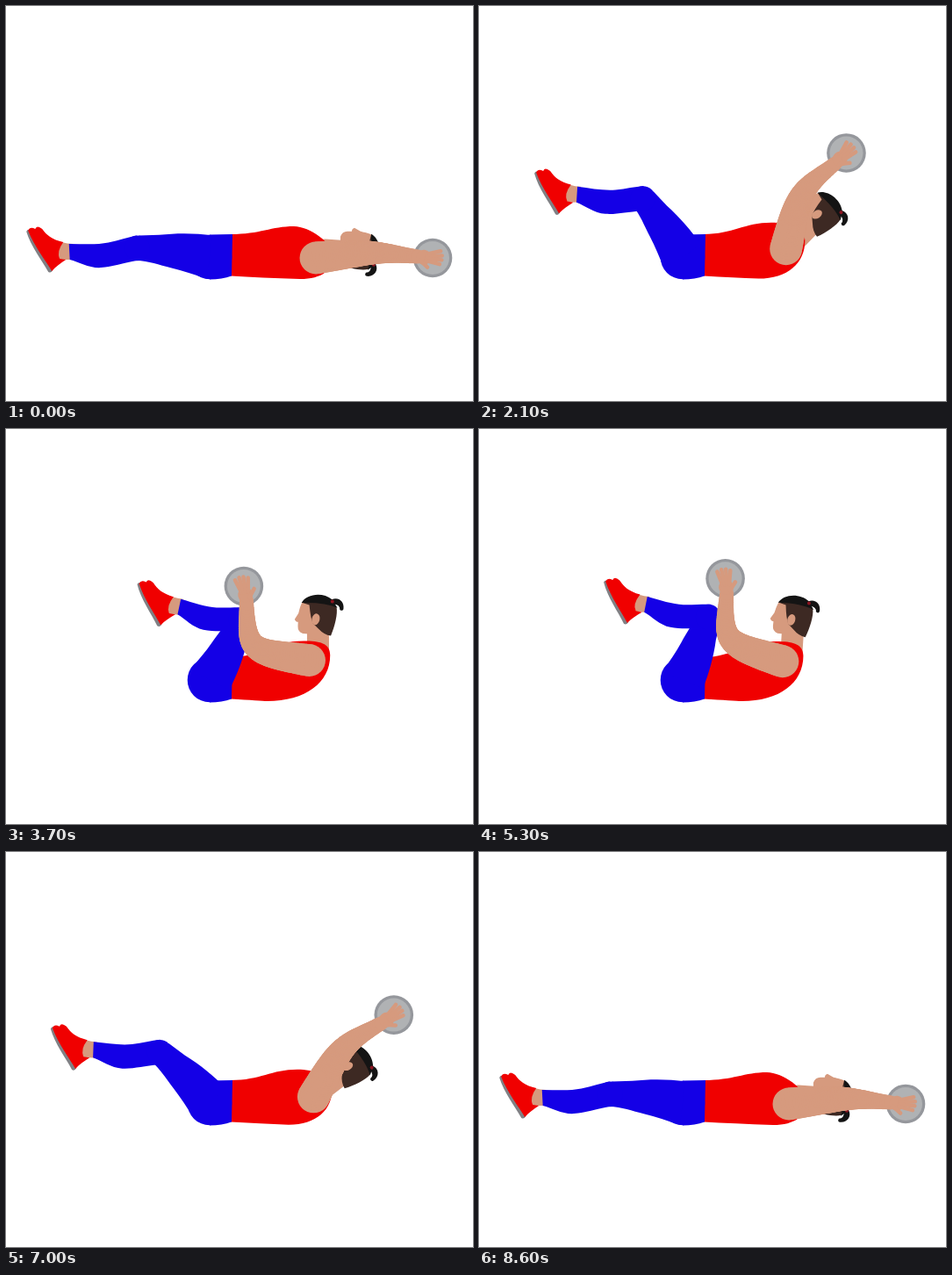
Recreate the animation shown at these times as an HTML page with a canvas. Size 532x450 px, loop 8700 ms.

```html
<!DOCTYPE html>
<html lang="en">
<head>
<meta charset="utf-8">
<title>Weighted crunch</title>
<style>
  html, body { margin: 0; width: 100%; height: 100%; overflow: hidden; background: #fff; }
  canvas { display: block; position: fixed; left: 0; top: 0; }
</style>
</head>
<body>
<canvas id="stage" width="532" height="450"></canvas>
<script>
const ctx = document.getElementById('stage').getContext('2d');
const LOOP = 8700, STEP = 100;
const SKIN = '#d69a7e', RED = '#f00000', BLUE = '#1400e6', BLACK = '#141414', BROWN = '#3d2923';
const HIP = { x: 232, y: 286 };
const UPPER_ARM = 64, FOREARM = 69.5;

const shapes = {
  face: new Path2D('M-16-16C-19-10-19-6-20-3L-24 4Q-23 7-20 7L-20 12Q-20 18-14 20L-7 20L-5 26L14 24L17-10Z'),
  hair: new Path2D('M-16-15C-8-20 14-22 23-12C25-4 22 10 18 21Q10 20 4 14L-3 8Q-6 2-8-13Z'),
  cap: new Path2D('M-17-15C-12-25 6-29 18-20L24-11Q10-17-17-15Z'),
  bun: new Path2D('M17-20C24-24 32-19 31-10Q30-7 27-9Q27-15 19-15Z'),
  sole: new Path2D('M-49-23Q-48-26-45-25L-19 21Q-21 25-24 23C-31 10-44-6-49-23Z'),
  shoe: new Path2D('M-47-24Q-45-29-39-26Q-37-31-31-26C-26-19-20-14-7-11Q-15 0-11 8L-4 9C-10 13-16 17-20 22C-27 10-40-6-47-24Z'),
  ankle: new Path2D('M-9-11Q-2-9 4-9L4 9L-11 9Q-15 0-9-11Z'),
  shin: new Path2D('M0-14.5C10-13 20-10 32-8C45-6 60-8 76-9L76 9C66 12 55 20 42 20C28 20 18 16 0 14Z'),
  thigh: new Path2D('M0-25C18-25 38-23 58-18L80-14.5L80 14C65 13 55 16 40 17.6C28 19 14 22 0 25Z'),
  pelvis: new Path2D('M232 260.5L258 260L257 307.5Q246 311.5 232 311.5Z')
};

const mix = (a, b, u) => a + (b - a) * u;
const heading = (a, b) => Math.atan2(b.y - a.y, b.x - a.x);
const distance = (a, b) => Math.hypot(b.x - a.x, b.y - a.y);
const radians = degrees => degrees * Math.PI / 180;

// Point at a distance from another; 0 degrees is right, 90 is up
const polar = (from, length, degrees) => ({
  x: from.x + length * Math.cos(radians(degrees)),
  y: from.y - length * Math.sin(radians(degrees))
});

function fill(path, color) {
  ctx.fillStyle = color;
  ctx.fill(path);
}

function disc(x, y, r, color) {
  ctx.fillStyle = color;
  ctx.beginPath();
  ctx.arc(x, y, r, 0, 2 * Math.PI);
  ctx.fill();
}

function line(x1, y1, x2, y2, width) {
  ctx.strokeStyle = SKIN;
  ctx.lineCap = 'round';
  ctx.lineWidth = width;
  ctx.beginPath();
  ctx.moveTo(x1, y1);
  ctx.lineTo(x2, y2);
  ctx.stroke();
}

function placed(p, angle, draw) {
  ctx.save();
  ctx.translate(p.x, p.y);
  ctx.rotate(angle);
  draw();
  ctx.restore();
}

// 0 is stretched out, 1 is fully curled; the way back lingers a little
function curlAt(step) {
  const half = LOOP / STEP / 2;
  const swing = (1 - Math.cos(Math.PI * step / half)) / 2;
  const q = step < half ? swing : swing ** .85;
  return 1.15 * q * q / (q + .15);
}

function drawHead(shoulder, curl) {
  const tilt = curl ** .8, angle = radians(mix(90, -2, tilt));
  const head = polar(shoulder, 49 + 7 * Math.sin(Math.PI * curl), mix(12, 85, tilt));
  const c = Math.cos(angle), s = Math.sin(angle);
  line(head.x + 3 * c - 13 * s, head.y + 3 * s + 13 * c, shoulder.x + 10, shoulder.y - 9, 25);
  placed(head, angle, () => {
    fill(shapes.face, SKIN);
    fill(shapes.hair, BROWN);
    fill(shapes.cap, BLACK);
    fill(shapes.bun, BLACK);
    disc(18, -18, 2, '#8c1420');
    ctx.fillStyle = SKIN;
    ctx.beginPath();
    ctx.ellipse(0, 3, 4.5, 6.5, .2, 0, 2 * Math.PI);
    ctx.fill();
  });
}

function drawShirt(curl) {
  const top = { x: mix(328, 340, curl), y: mix(251, 241, curl) };
  const right = { x: mix(373, 369, curl), y: mix(285, 257, Math.sqrt(curl)) };
  const base = { x: mix(335, 295, curl), y: mix(311, 310, curl) };
  ctx.fillStyle = RED;
  ctx.beginPath();
  ctx.moveTo(256, 260);
  ctx.bezierCurveTo(290, 260, 302, top.y, top.x, top.y);
  ctx.bezierCurveTo(top.x + 18, top.y, right.x, right.y - 14, right.x, right.y);
  ctx.bezierCurveTo(right.x, mix(right.y, base.y, .6), base.x + mix(25, 45, curl), base.y, base.x, base.y);
  ctx.quadraticCurveTo(290, 309.5, 256, 307.5);
  ctx.fill();
}

function drawLeg(curl) {
  const knee = polar(HIP, mix(83, 77, curl), 180 - mix(7, 125, curl));
  const ankle = polar(knee, mix(77.5, 72, curl), 180 - mix(-3, 13, curl));
  placed(ankle, radians(3 * curl), () => {
    fill(shapes.ankle, SKIN);
    fill(shapes.sole, '#808084');
    fill(shapes.shoe, RED);
  });
  fill(shapes.pelvis, BLUE);
  disc(HIP.x, HIP.y, 25.3, BLUE);
  // Bones point left at rest, so mirror them to keep the front side on top
  const bone = (from, to, length, path) => placed(from, heading(from, to), () => {
    ctx.scale(distance(from, to) / length, -1);
    fill(path, BLUE);
  });
  bone(HIP, knee, 80, shapes.thigh);
  bone(knee, ankle, 76, shapes.shin);
  disc(knee.x, knee.y, 14.3, BLUE);
}

function bendElbow(shoulder, hand) {
  const d = Math.min(distance(shoulder, hand), UPPER_ARM + FOREARM);
  const along = (UPPER_ARM ** 2 - FOREARM ** 2 + d * d) / (2 * d);
  const out = Math.sqrt(Math.max(0, UPPER_ARM ** 2 - along * along));
  const a = heading(shoulder, hand), c = Math.cos(a), s = Math.sin(a);
  return { x: shoulder.x + along * c + out * s, y: shoulder.y + along * s - out * c };
}

// Tapered curve from a to b that passes through mid
function limb(a, mid, b, ra, rb) {
  const at = (u, axis) => {
    const control = (4 * mid[axis] - (a[axis] + b[axis]) / 2) / 3;
    return (1 - u) ** 3 * a[axis] + 3 * u * (1 - u) * control + u ** 3 * b[axis];
  };
  for (let u = 0; u <= 1; u += 1 / 64) disc(at(u, 'x'), at(u, 'y'), mix(ra, rb, u), SKIN);
}

function drawArm(shoulder, curl) {
  const weight = polar(shoulder, 133 - 23 * curl * curl, 140 * curl);
  const elbow = bendElbow(shoulder, weight), angle = heading(elbow, weight);
  const wrist = { x: weight.x - 17 * Math.cos(angle), y: weight.y - 17 * Math.sin(angle) };
  disc(weight.x, weight.y, 22.3, '#95979c');
  disc(weight.x, weight.y, 19, '#b0b2b4');
  limb(shoulder, elbow, wrist, 18.5, 8);
  placed(weight, angle, () => {
    disc(-10, 0, 8.5, SKIN);
    for (let finger = -1.5; finger <= 1.5; finger++) {
      line(-7, 2.5 * finger, 11.5 - 2 * Math.abs(finger), 5 * finger - 1, 4.5);
    }
    line(-14, 4, -5, 11, 4.5);
  });
}

function draw(step) {
  const curl = curlAt(step);
  const shoulder = { x: mix(353, 345, curl), y: mix(287, 262, curl) };
  ctx.fillStyle = '#fff';
  ctx.fillRect(0, 0, 532, 450);
  drawHead(shoulder, curl);
  drawShirt(curl);
  drawLeg(curl);
  drawArm(shoulder, curl);
}

const start = performance.now();
function tick() {
  draw(Math.floor((performance.now() - start) % LOOP / STEP));
  requestAnimationFrame(tick);
}
tick();
</script>
</body>
</html>
```
